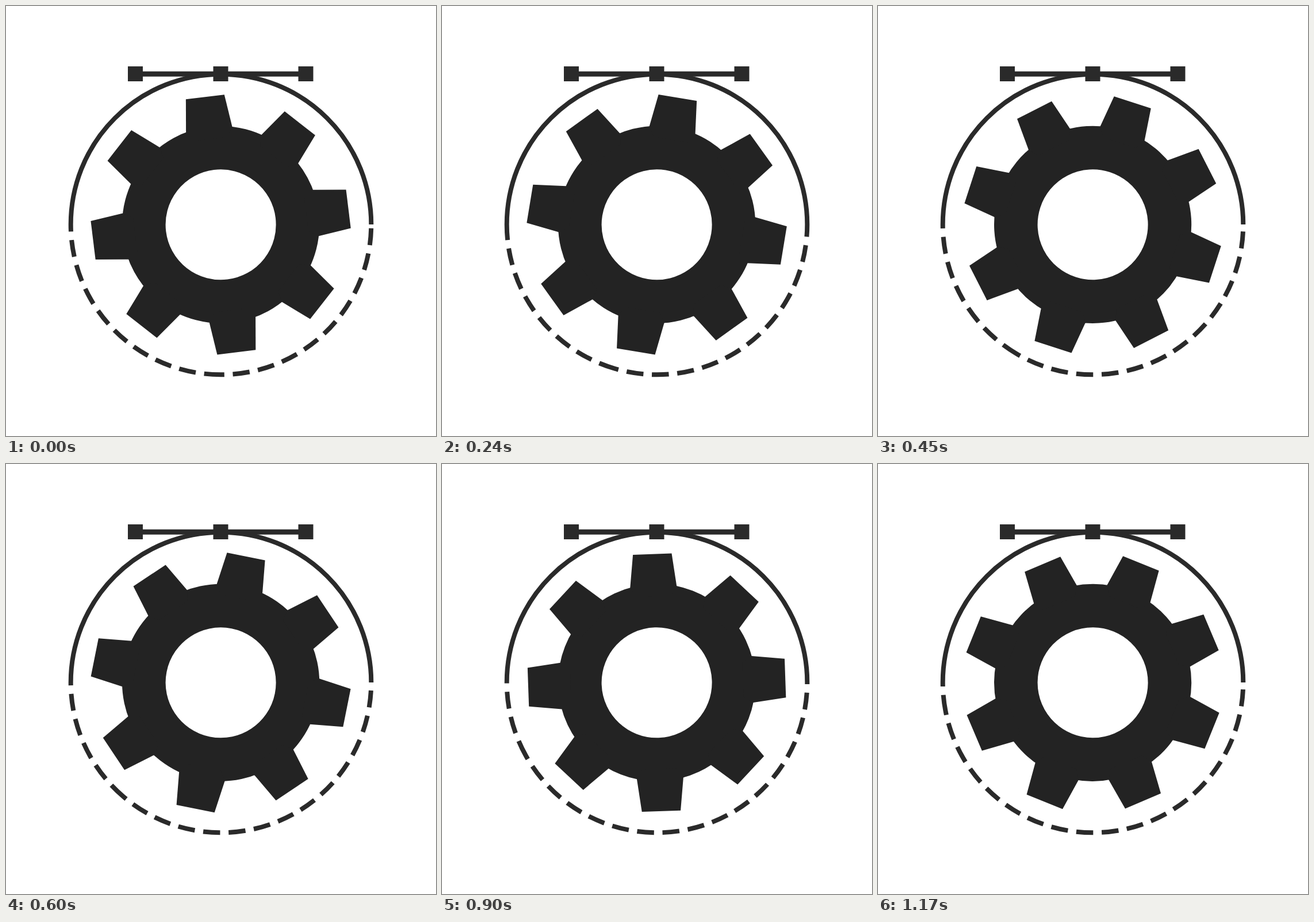
An HTML page that plays this animation: 748 px wide and 748 px high, repeating every 1.2 s.

```html
<!DOCTYPE html>
<html lang="en">
<head>
<meta charset="utf-8">
<title>Gear and path</title>
<style>
  html, body { margin: 0; width: 100%; height: 100%; overflow: hidden; background: #fff; }
  svg { display: block; width: 100%; height: 100%; }
</style>
</head>
<body>
<svg viewBox="0 0 748 748">
  <g fill="none" stroke="#2a2a2a" stroke-width="8">
    <path d="M112.7 380A261.3 261.3 0 0 1 635.3 380"/>
    <g clip-path="url(#lower)">
      <circle id="dashes" cx="374" cy="380" r="261.3" pathLength="360" stroke-dasharray="6.465 3.23"/>
    </g>
    <path d="M225 118.3H521" stroke-width="9"/>
  </g>
  <path d="M212 105h26v26h-26zM360.5 105h26v26h-26zM508.5 105h26v26h-26z" fill="#2a2a2a"/>
  <g id="gear" fill="#232323">
    <circle r="133.8" fill="none" stroke="#232323" stroke-width="75.6"/>
  </g>
  <clipPath id="lower"><rect y="380" width="748" height="368"/></clipPath>
</svg>
<script>
  const LOOP = 1200, STEP = 30;
  const GEAR_START = -7, GEAR_TURN = 23 / 3, DASH_TURN = 2.02; // degrees per step
  const gear = document.getElementById("gear");
  const dashes = document.getElementById("dashes");

  for (let i = 0; i < 8; i++) {
    const tooth = document.createElementNS("http://www.w3.org/2000/svg", "path");
    tooth.setAttribute("d", "M-40.5 -166.5L-33.7 -223.7H33.7L40.5 -166.5L30 -150H-30Z");
    tooth.setAttribute("transform", `rotate(${i * 45})`);
    gear.append(tooth);
  }

  function draw(ms) {
    const n = Math.floor((ms % LOOP) / STEP);
    gear.setAttribute("transform", `translate(373.6 380.3) rotate(${GEAR_START + n * GEAR_TURN})`);
    dashes.setAttribute("transform", `rotate(${90 + n * DASH_TURN} 374 380)`);
  }

  const start = performance.now();
  function tick() {
    draw(performance.now() - start);
    requestAnimationFrame(tick);
  }
  draw(0);
  requestAnimationFrame(tick);
</script>
</body>
</html>
```
